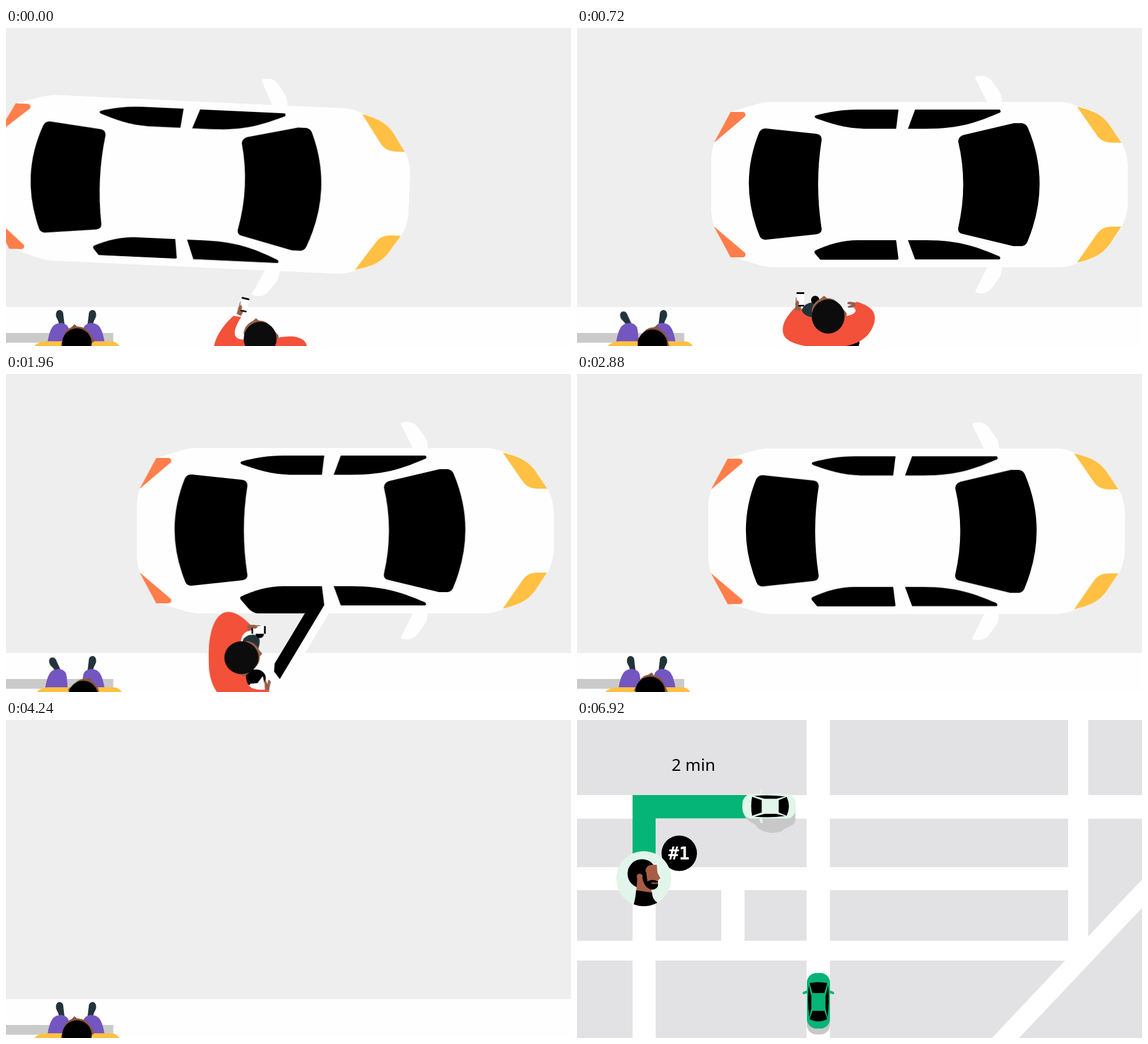
These frames come from a looping animation (956 by 538 pixels, 8 s). An HTML page:

```html
<!DOCTYPE html>
<html lang="en">
<head>
<meta charset="utf-8">
<title>Pickup</title>
<style>
html, body { margin: 0; width: 100%; height: 100%; overflow: hidden; background: #eee; }
svg { display: block; width: 100vw; height: 100vh; }

/* One shared clock: 1% = 80 ms */
.car, .door, .shut, .rider, .torso, .arm, .leg-l, .leg-r, .reach,
.foot, .thigh, .coat, .head, .map, .match, .tint {
  animation: 8s linear infinite;
}

.car { animation-name: drive; transform-origin: 579.5px 265px; }
@keyframes drive {
  0% { transform: translate(-250px, 0) rotate(2.64deg); animation-timing-function: cubic-bezier(.333, .667, .667, 1); }
  9%, 10% { transform: translate(0, 0) rotate(0deg); animation-timing-function: ease-in-out; }
  15%, 34% { transform: translate(-5.5px, 0) rotate(0deg); }
  35.5%, 36.5% { transform: translate(-5px, 1.2px) rotate(0deg); }
  39.4% { transform: translate(-5px, 0) rotate(0deg); animation-timing-function: cubic-bezier(.34, 0, .68, .32); }
  53%, 100% { transform: translate(787px, 0) rotate(0deg); }
}

.door { animation-name: swing, ajar; animation-duration: 8s, 8s; animation-timing-function: linear, step-end; transform-origin: 544px 391px; }
@keyframes swing {
  0%, 18.5% { transform: rotate(0deg); animation-timing-function: ease-in-out; }
  24%, 30.5% { transform: rotate(-59deg); animation-timing-function: ease-in-out; }
  34.5%, 100% { transform: rotate(0deg); }
}
@keyframes ajar {
  0% { visibility: hidden; }
  18.5% { visibility: visible; }
  34.5%, 100% { visibility: hidden; }
}
.shut { animation-name: shut; animation-timing-function: step-end; }
@keyframes shut {
  0% { visibility: visible; }
  18.5% { visibility: hidden; }
  34.5%, 100% { visibility: visible; }
}

.rider { animation-name: walk, board; animation-duration: 8s, 8s; animation-timing-function: linear, step-end; }
@keyframes walk {
  0% { transform: translate(430px, 525px) rotate(0deg); animation-timing-function: ease-in-out; }
  9%, 11% { transform: translate(425px, 487px) rotate(0deg); animation-timing-function: ease-in-out; }
  18.5% { transform: translate(402px, 482px) rotate(80deg); animation-timing-function: ease-out; }
  24.5% { transform: translate(399.5px, 480px) rotate(90deg); animation-timing-function: ease-in-out; }
  28% { transform: translate(446px, 420px) rotate(60deg); animation-timing-function: ease-out; }
  31.5%, 100% { transform: translate(480px, 290px) rotate(60deg); }
}
@keyframes board { 0% { visibility: visible; } 31.5%, 100% { visibility: hidden; } }

.torso { animation-name: torso; }
@keyframes torso {
  0% { d: path("M-45 -38C-60 -25 -75 -5 -78 14C-78 46 -40 54 0 54C40 53 79 44 79 14C79 2 62 -5 46 -3L34 -2C32 -1 28 1 20 2L-28 2C-44 2 -50 -8 -32 -36Z"); animation-timing-function: ease-in-out; }
  9%, 15% { d: path("M-56 -14C-70 0 -80 15 -76 30C-72 46 -40 54 0 54C40 53 68 44 78 12C82 -6 74 -16 48 -24L44 -13C52 -6 40 0 20 2L-28 2C-38 1 -46 -6 -45 -13Z"); animation-timing-function: ease-in-out; }
  22%, 100% { d: path("M-56 -14C-70 0 -80 15 -77 28C-72 48 -40 57 0 57C40 57 68 46 80 12C84 -6 76 -34 62 -48L54 -44C55 -20 54 -7 26 -6L20 2L-28 2C-38 1 -46 -6 -45 -13Z"); }
}
.arm { animation-name: arm; }
@keyframes arm {
  0% { transform: translate(-27px, -57px) rotate(13deg); animation-timing-function: ease-in-out; }
  9%, 100% { transform: translate(-47px, -28px) rotate(0deg); }
}
.reach { animation-name: reach; }
@keyframes reach {
  0% { transform: translate(24px, 6px); animation-timing-function: ease-in-out; }
  9%, 15% { transform: translate(40px, -20px); animation-timing-function: ease-in-out; }
  22%, 100% { transform: translate(45px, -44px); }
}
.leg-l { animation-name: leg-l; transform-origin: -30px -11px; }
@keyframes leg-l {
  0% { transform: translate(0, 34px) rotate(0deg); }
  4% { transform: translate(0, 30px) rotate(0deg); animation-timing-function: ease-in-out; }
  9% { transform: translate(0, 0) rotate(0deg); }
  14% { transform: translate(0, 25px) rotate(0deg); animation-timing-function: ease-in-out; }
  22%, 100% { transform: translate(2px, -6px) rotate(-70deg); }
}
.leg-r { animation-name: leg-r; }
@keyframes leg-r {
  0% { transform: translate(38px, 30px); }
  9% { transform: translate(38px, 46px); animation-timing-function: ease-in-out; }
  15% { transform: translate(30px, 0); animation-timing-function: ease-in-out; }
  22%, 100% { transform: translate(35px, -25px); }
}

.foot { animation-name: foot; transform-origin: 95px 503px; }
@keyframes foot {
  0%, 2% { transform: none; animation-timing-function: ease-in-out; }
  8%, 29% { transform: translate(-6px, 0) rotate(-18deg); animation-timing-function: ease-in-out; }
  35%, 100% { transform: none; }
}
.thigh { animation-name: shift; }
@keyframes shift {
  0%, 2% { transform: none; animation-timing-function: ease-in-out; }
  8%, 29% { transform: translate(-4px, 0); animation-timing-function: ease-in-out; }
  35%, 100% { transform: none; }
}
.coat { animation-name: lean; }
@keyframes lean {
  0%, 2% { transform: none; animation-timing-function: ease-in-out; }
  8%, 29% { transform: translate(4px, 0); animation-timing-function: ease-in-out; }
  35%, 100% { transform: none; }
}
.head { animation-name: look; transform-origin: 120px 532px; }
@keyframes look {
  0% { transform: none; animation-timing-function: ease-in-out; }
  9% { transform: translate(8px, 2px) rotate(22deg); animation-timing-function: ease-in-out; }
  22%, 27% { transform: translate(11px, 11px) rotate(30deg); animation-timing-function: ease-in-out; }
  36% { transform: translate(4px, 4px) rotate(12deg); animation-timing-function: ease-in-out; }
  42%, 100% { transform: none; }
}

.map { animation-name: map; animation-timing-function: step-end; }
@keyframes map { 0% { visibility: hidden; } 66.5%, 100% { visibility: visible; } }
.match { animation-name: match; animation-timing-function: step-end; }
@keyframes match { 0% { visibility: hidden; } 86.5%, 100% { visibility: visible; } }
.tint { animation-name: tint; animation-timing-function: step-end; }
@keyframes tint { 0% { color: #e1f5ea; } 86.5%, 100% { color: #05b477; } }
</style>
</head>
<body>
<svg viewBox="0 0 956 538" preserveAspectRatio="none">
  <defs>
    <g id="side">
      <path fill="#fefefe" d="M674 85Q673 81 685 81C700 82 703 92 715 108Q719 115 719 127H695Z"/>
      <path fill="#ffc043" d="M846 133C875 140 890 148 903 167L921 194H906C893 194 886 190 880 182Z"/>
      <path fill="#ff7e4b" d="M260 142H281Q286 143 285 149L232 194Z"/>
    </g>
    <g id="shell">
      <path fill="#fefefe" d="M330 125H815C830 125 838 129 847 132C875 140 890 148 904 168L921 194C930 208 932 225 932 240V290C932 310 928 325 921 337L904 362C890 382 875 390 847 398C838 401 830 405 815 405H335C315 405 300 398 259 386L232 335C228 325 227 310 227 300V228C227 215 229 205 232 194L260 142C290 134 310 125 330 125Z"/>
      <use href="#side"/>
      <use href="#side" transform="matrix(1 0 0 -1 0 530)"/>
      <path d="M320 170L405 179Q414 180 414 189Q402 264 414 340Q414 348 405 349L321 358Q312 359 309 352Q273 264 308 177Q312 169 320 170Z"/>
      <path d="M654 181L739 161H753Q760 162 763 169Q803 264 762 362Q759 368 753 369H738L651 348Q644 346 645 338Q662 264 645 192Q645 184 654 181Z"/>
      <path d="M404 148C425 142 450 138 475 138H544L540 170.500H490C455 170 430 162 405 153Q400 150 404 148Z"/>
      <path d="M572 138H715Q718 140 716 143C680 158 650 170.500 590 170.500H560Z"/>
      <path d="M560 359H590C650 359 680 372 714 386Q718 389 715 391.500H572Z"/>
      <path d="M404 376C425 366 450 359 475 359H540L544 391L510 405H431Q423 404 416 397L403 382Q400 378 404 376Z"/>
    </g>
    <clipPath id="roof"><path d="M200 60H960V391.500H200Z"/></clipPath>

    <path id="foot" fill="#22343a" d="M84.500 485Q85 477 91 477Q97 478 97 485L99 502H90Q89 496 86 491Q84 488 84.500 485Z"/>
    <path id="thigh" fill="#7356bf" d="M70 533Q73 513 79 505Q84 499 94 499Q104 501 106 508Q108 518 108 533Z"/>

    <g id="mini">
      <path fill="currentColor" d="M-18 -18L-26 -15Q-28 -12 -25 -11L-18 -13ZM18 -18L26 -15Q28 -12 25 -11L18 -13Z"/>
      <rect x="-19.500" y="-47" width="39" height="94" rx="16" fill="currentColor"/>
      <path d="M-15 -30Q0 -33 15 -30L10 -13H-10ZM-10 17H10L15 31Q0 39 -15 31Z"/>
      <path id="pane" d="M-16.500 -26L-12 -8V13L-15.500 28Q-19 0 -16.500 -26Z"/>
      <use href="#pane" transform="scale(-1 1)"/>
    </g>
    <clipPath id="disc"><circle cx="113" cy="268.500" r="46.500"/></clipPath>
  </defs>

  <g id="street">
    <path fill="#eee" d="M0 0H956V472H0Z"/>
    <path fill="#fefefe" d="M0 472H956V538H0Z"/>
    <path fill="#cacaca" d="M0 516H181.500V532.500H0Z"/>

    <g class="car">
      <use href="#shell"/>
      <path class="shut" fill="#fefefe" d="M402 382L412 391.500H546V405H420L400 388Z"/>
    </g>

    <g class="rider">
      <path fill="#fefefe" d="M-45 -18H-34V0H-45Z"/>
      <g class="leg-r"><path d="M-15 20V0A15 15 0 0 1 15 0L9 20Z"/></g>
      <g class="leg-l">
        <path fill="#22343a" d="M-45 2V-10Q-40 -22 -26 -23Q-15 -20 -16 2Z"/>
        <circle cx="-22" cy="-27" r="7"/>
      </g>
      <g class="reach">
        <path fill="#fefefe" d="M-14 9L4 5L9 10L5 31L-1 31L-2 18Z"/>
        <path fill="#965f4a" d="M15 -1L-4 -4Q-9 -3 -7 0L0 1L-7 4Q-7 7 -2 6L15 5Z"/>
      </g>
      <path class="torso" fill="#f4513a" d="M-56 -14C-70 0 -80 15 -76 30C-72 46 -40 54 0 54C40 53 68 44 78 12Z"/>
      <g class="arm">
        <path fill="#965f4a" d="M-9 18L-8 4Q-9 -5 -4 -5L-3 2L6 5Q8 8 2 9L-1 20Z"/>
        <rect x="-6.500" y="-12" width="13" height="24" rx="1" fill="#fff"/>
        <path d="M-6.500 -12H6.500V-9H-6.500ZM-4 9.500H6.500V12H-4Z"/>
        <path fill="#965f4a" d="M-9 8L-5 1L-2 6L-5 15Z"/>
      </g>
      <path fill="#965f4a" d="M-28 -8Q-27 -22 -13 -29L-7 -34L-2 -30Q10 -31 18 -20L31 -5Q33 1 27 2L-20 10Z"/>
      <ellipse cy="1" rx="27.800" ry="29" fill="#0c0c0c"/>
    </g>

    <g class="car">
      <use href="#shell" clip-path="url(#roof)"/>
      <g class="door">
        <path fill="#fefefe" d="M544 391V405H430Q415 403 398 391Z"/>
        <path d="M544 391H398L404 376L416 370H540Z"/>
      </g>
    </g>

    <g class="foot"><use href="#foot"/></g>
    <g class="thigh"><use href="#thigh"/></g>
    <g transform="matrix(-1 0 0 1 237 0)"><use href="#foot"/><use href="#thigh"/></g>
    <path class="coat" fill="#ffc043" d="M48 538Q56 530 68 530H178Q190 531 193 541H48Z"/>
    <g class="head">
      <path fill="#8b5539" d="M93 538Q93 532 97 528Q98 511 111 506L116 501L120 505Q136 505 143 519L149 527Q150 532 145 533Z"/>
      <circle cx="120" cy="533" r="25"/>
    </g>
  </g>

  <g class="map">
    <path fill="#fff" d="M0 0H956V538H0Z"/>
    <path fill="#e2e2e4" d="M0 0H388.500V127H0ZM428 0H831V127H428ZM865 0H956V127H865Z
      M0 167H94V249H0ZM133 167H388.500V249H133ZM428 167H831V249H428Z
      M0 288H94V373.500H0ZM133 288H244V373.500H133ZM283.500 288H388.500V373.500H283.500ZM428 288H831V373.500H428Z
      M0 407H94V538H0ZM133 407H388.500V538H133ZM428 407H826L702 538H428Z
      M865 167H956V270L865 366ZM956 318V538H748Z"/>
    <path class="match" fill="#05b477" d="M94 127H300V166.500H133V240H94Z"/>
    <path fill="#c8c8c9" d="M281 150C283 176 300 170 306 183Q325 196 347 188C352 180 369 182 369.500 168V150Z"/>
    <g color="#e1f5ea"><use href="#mini" transform="translate(325 146) rotate(-90) scale(1.060 .960)"/></g>
    <rect x="389" y="440" width="39" height="92" rx="16" fill="#c8c8c9"/>
    <g class="tint"><use href="#mini" transform="translate(408.500 475)"/></g>

    <g class="match">
      <circle cx="173" cy="225.500" r="30"/>
      <text x="172.500" y="236" text-anchor="middle" fill="#fff" font-family="'DejaVu Sans Mono', monospace" font-weight="700" font-size="30">#1</text>
      <text x="160" y="86" font-family="'Noto Sans', sans-serif" font-weight="500" font-size="28">2 min</text>
    </g>
    <circle cx="113" cy="268.500" r="46.500" fill="#e1f5ea"/>
    <g clip-path="url(#disc)">
      <circle cx="110" cy="260" r="24.500"/>
      <path fill="#a85c46" d="M102 268H122L127 293H100Z"/>
      <path fill="#a85c46" d="M116 256Q116 246 126 245H135L136 258L141 268L137 271V280H116Z"/>
      <path d="M110 257H117L119 273Q128 268 137 273V281Q134 287 126 287Q114 284 111 268Z"/>
      <path fill="#a85c46" d="M125 275H137V277H127Z"/>
      <circle cx="106" cy="265" r="5" fill="#a85c46"/>
      <path d="M94 318Q99 304 100 288L127 292Q127 303 136 309V318Z"/>
    </g>
  </g>
</svg>
</body>
</html>
```
